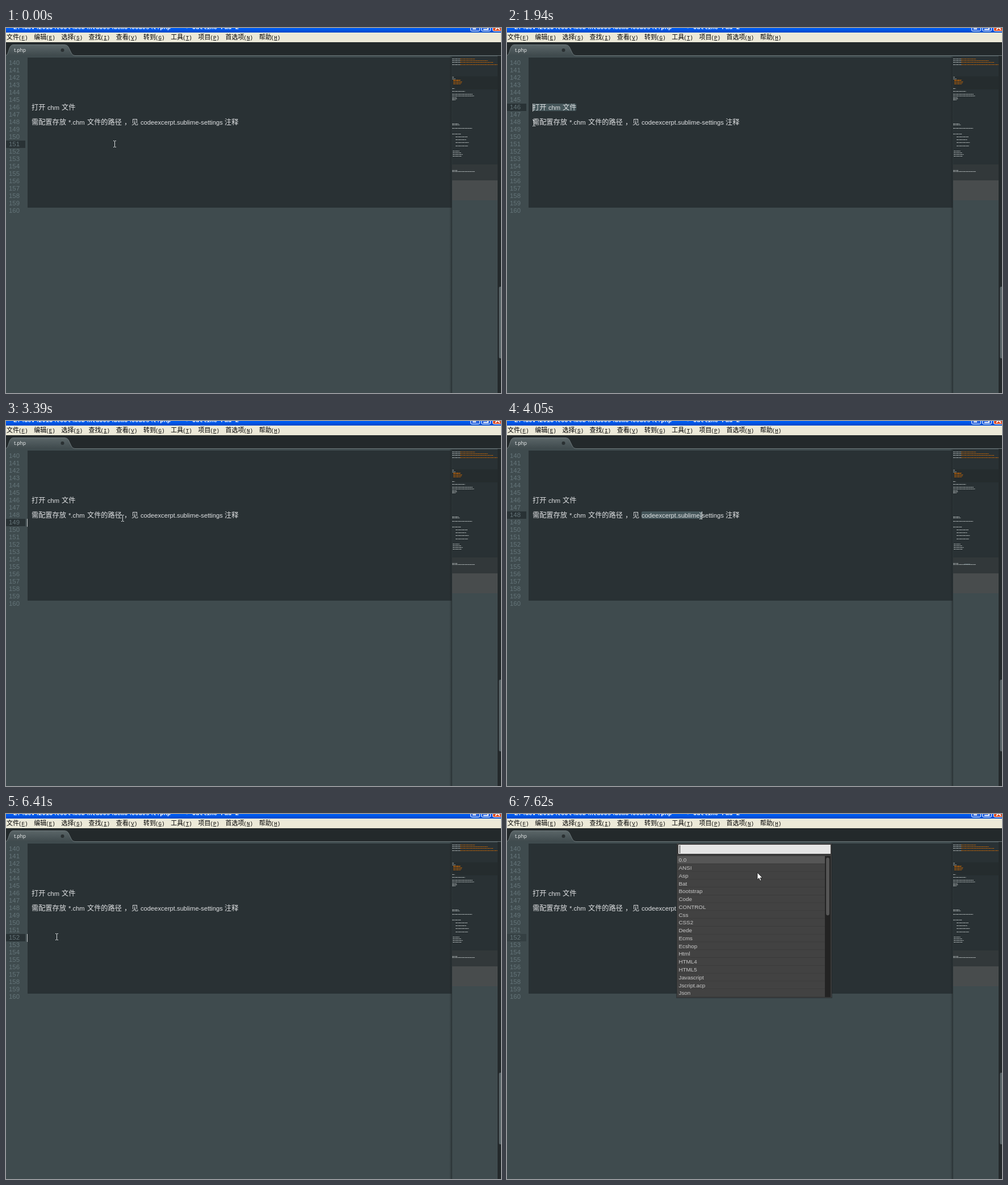
An HTML page that plays this animation: 872x642 px, repeating every 8 s.

```html
<!DOCTYPE html>
<html lang="zh-CN">
<head>
<meta charset="utf-8">
<title>t.php</title>
<style>
  html, body { margin: 0; width: 100%; height: 100%; overflow: hidden; background: #3f4b4e; }
  svg { display: block; }
  text { white-space: pre; }
  .cjk { font-family: "Noto Sans CJK SC", "Noto Sans CJK", sans-serif; font-weight: 300; }
  .code { font-family: "Liberation Sans", Arial, sans-serif; font-size: 11.2px; fill: #e0e2e4; }
  .code.cjk { font-family: "Noto Sans CJK SC", "Noto Sans CJK", sans-serif; font-size: 12.2px; }
  .num { font-family: "Liberation Sans", Arial, sans-serif; font-size: 11.4px; fill: #65757a; }
  .menu { font-size: 11px; fill: #000; }
  .key { font-family: "Liberation Mono", monospace; font-size: 9.2px; }
  .title { font: bold 10.5px "Liberation Mono", monospace; fill: #fff; }
  .tab { font: 8.6px "Open Sans", sans-serif; fill: #f2f4f4; }
  .item { font-family: "Liberation Sans", Arial, sans-serif; font-size: 9.8px; fill: #c8c8c8; }
</style>
</head>
<body>
<svg width="872" height="642" viewBox="0 0 872 642">
  <defs>
    <linearGradient id="tabFill" x2="0" y2="1">
      <stop offset="0" stop-color="#5b6668"/><stop offset="1" stop-color="#3f4a4d"/>
    </linearGradient>
    <linearGradient id="blue" x2="0" y2="1">
      <stop offset="0" stop-color="#0061fc"/><stop offset="1" stop-color="#0047c8"/>
    </linearGradient>
    <linearGradient id="edge">
      <stop offset="0" stop-color="#1c2224" stop-opacity="0"/><stop offset="1" stop-color="#1c2224" stop-opacity=".6"/>
    </linearGradient>
  </defs>

  <rect width="872" height="642" fill="#3f4b4e"/>
  <rect x="38" y="52" width="747" height="264" fill="#293134"/>
  <rect id="row" width="34" height="13"/>
  <g id="numbers"></g>
  <rect id="sel" height="13" rx="2" fill="#45565a"/>
  <g id="code"></g>
  <rect id="caret" width="1" height="14" fill="#c8cccd"/>

  <g id="map">
    <rect x="786" y="50" width="80" height="218" fill="#293134"/>
    <rect x="786" y="85" width="80" height="23" fill="#252c2e"/>
    <rect x="786" y="240" width="80" height="28" fill="#32383a"/>
    <rect x="786" y="268" width="80" height="35" fill="#484c4d"/>
    <rect id="mapSel" x="786" y="251" height="2" fill="#566569"/>
  </g>
  <rect x="781" y="50" width="5" height="592" fill="url(#edge)"/>
  <rect x="866" y="48" width="6" height="594" fill="#23292b"/>
  <rect x="868.5" y="455" width="5" height="126" rx="2" fill="#5a6568"/>

  <rect y="25" width="872" height="23" fill="#23292b"/>
  <path id="tab" d="M0 48.500C6 46 4 29.500 13 29.500H103Q108 29.500 110 33.500L115 44Q117 48.500 121 48.500" fill="url(#tabFill)" stroke="#6c777a"/>
  <path d="M121 48.500H872" stroke="#6c777a"/>
  <text class="tab" x="14" y="41.500">t.php</text>
  <circle cx="99.500" cy="39" r="3" fill="#2a3032"/>

  <rect width="872" height="8" fill="url(#blue)"/>
  <text class="title" x="13" y="2">E:\dev\2013\tool\web\htdocs\demo\codes\t.php •  - Outline Pad 2</text>
  <g stroke="#fff">
    <rect x="818.500" y="-9.500" width="16" height="15" rx="2" fill="#2a66e0"/>
    <rect x="837.500" y="-9.500" width="16" height="15" rx="2" fill="#2a66e0"/>
    <rect x="857.500" y="-9.500" width="16" height="15" rx="2" fill="#dc4a22"/>
    <path d="M822 1.500H828M841 2.500H849V0M862 3L866 -1L870 3" fill="none" stroke-width="2"/>
  </g>
  <rect y="8" width="872" height="17" fill="#ece9d8"/>
  <g id="menu"></g>

  <g id="panel">
    <rect x="298" y="52" width="275" height="272" fill="#1c2224" opacity=".5"/>
    <rect x="299" y="52" width="273" height="271" fill="#3b3b3b"/>
    <rect x="302" y="54" width="268" height="16" fill="#e5e5e5"/>
    <rect id="field" x="304" y="55" width="1" height="14" fill="#222"/>
    <rect x="300" y="74" width="260" height="248" fill="#424242"/>
    <rect x="560" y="74" width="10" height="248" fill="#232323"/>
    <rect x="562.500" y="77" width="5" height="101" rx="2.500" fill="#555" stroke="#666" stroke-width=".5"/>
    <g id="items"></g>
  </g>

  <path id="beam" d="M-2.500 -5.500H-.5M.5 -5.500H2.500M0 -5V5M-2.500 5.500H-.5M.5 5.500H2.500" fill="none" stroke="#d8dcdd"/>
  <path id="arrow" d="M0 0V12.500L2.800 9.800L5 14.500L7 13.600L5 9.200H9Z" fill="#fff" stroke="#111" stroke-width=".8"/>
</svg>

<script>
const $ = id => document.getElementById(id);
const LOOP = 8000, TICK = 131, BLINK = 540, OPEN = 6530, POINTER = 6680;

function set(el, attrs) {
  for (const k in attrs) el.setAttribute(k, attrs[k]);
}
function add(parent, tag, attrs, label) {
  const el = document.createElementNS('http://www.w3.org/2000/svg', tag);
  set(el, attrs);
  if (label) el.textContent = label;
  $(parent).append(el);
}
const show = (el, on) => set(el, { visibility: on ? 'visible' : 'hidden' });
const rowTop = n => 55 + 13 * (n - 140);

// Editor text
for (let n = 140; n <= 160; n++)
  add('numbers', 'text', { class: 'num', x: 5, y: rowTop(n) + 10 }, String(n));

function line(n, parts) {
  for (const [x, s] of parts) {
    const cjk = s.charCodeAt(0) > 255;
    add('code', 'text', { class: cjk ? 'code cjk' : 'code', x, y: rowTop(n) + 11 }, s);
  }
}
line(146, [[45, '打开'], [73, 'chm'], [98, '文件']]);
line(148, [[45, '需配置存放'], [110, '*.chm'], [143, '文件的路径'], [208, '，'], [221, '见'],
  [237, 'codeexcerpt.sublime-settings'], [385, '注释']]);

// Menu bar
let menuX = 1;
for (const entry of '文件F 编辑E 选择S 查找I 查看V 转到G 工具T 项目P 首选项N 帮助H'.split(' ')) {
  const name = entry.slice(0, -1), key = entry.slice(-1);
  const keyX = menuX + name.length * 11 - 1;
  add('menu', 'text', { class: 'cjk menu', x: menuX, y: 20 }, name);
  add('menu', 'text', { class: 'key', x: keyX, y: 19.5 }, `(${key})`);
  add('menu', 'rect', { x: keyX + 5.5, y: 21, width: 5.5, height: 1 });
  menuX += name.length * 11 + 26.2;
}

// Panel list
const names = 'ANSI Asp Bat Bootstrap Code CONTROL Css CSS2 Dede Ecms Ecshop Html HTML4 HTML5 Javascript Jscript.acp Json';
['0.0', ...names.split(' ')].forEach((name, i) => {
  const y = 74 + i * 13.77;
  add('items', 'rect', { x: 300, y, width: 260, height: 13.2, fill: i ? '#424242' : '#565656' });
  add('items', 'rect', { x: 300, y: y + 13, width: 260, height: 0.8, fill: '#393939' });
  add('items', 'text', { class: 'item', x: 302.5, y: y + 10.2 }, name);
});

// Minimap
let seed = 7;
const random = () => (seed = seed * 16807 % 2147483647) / 2147483647;
const WHITE = '#a9b0b1', ORANGE = '#b05f0c';

function stroke(y, indent, width, color) {
  add('map', 'path', {
    d: `M${786 + indent} ${Math.floor(y) + 0.5}h${width}`, stroke: color, 'stroke-dasharray': '3 .6 2 .5'
  });
}
function block(y, count, pitch, indent, width, color = WHITE) {
  for (let i = 0; i < count; i++)
    stroke(y + i * pitch, indent, width * (0.6 + 0.4 * random()), color);
}
for (let i = 0; i < 4; i++) {
  stroke(54 + i * 3.4, 0, 14, WHITE);
  stroke(54 + i * 3.4, 14, 26 + 40 * Math.sqrt(i / 3), ORANGE);
}
block(86, 2, 3, 0, 6);
block(91, 5, 1.8, 2, 18, ORANGE);
block(106, 1, 1, 0, 5);
block(111, 1, 1, 0, 25);
block(116, 2, 3, 0, 44);
block(122, 3, 2.2, 0, 9);
block(168, 2, 2, 0, 15);
block(176, 1, 1, 0, 40);
block(186, 1, 1, 0, 25);
block(191, 4, 5.4, 6, 24);
block(216, 4, 3, 1, 18);
stroke(250, 0, 9, WHITE);
stroke(252, 0, 40, WHITE);

// Pointer path: time, x, y
const path = [[0, 191, 204], [740, 122, 138], [1160, 122, 139], [1280, 104, 138], [1680, 46, 167], [2580, 49, 169],
  [2840, 150, 166], [3240, 206, 168], [3630, 203, 178], [4050, 341, 167], [4210, 384, 167], [4470, 391, 197],
  [4860, 122, 202], [5130, 85, 218], [5590, 89, 216], [OPEN, 89, 216], [7070, 441, 103]];

// Clicks and drags: time, row, anchor x, caret x
const edits = [[-BLINK, 151, 37, 37], [1160, 146, 122, 122], [1680, 146, 122, 45], [2060, 148, 57, 57],
  [2990, 148, 109, 143], [3240, 148, 109, 233], [3390, 149, 37, 37], [4050, 148, 237, 343], [4210, 148, 237, 382],
  [4350, 150, 37, 37], [5290, 152, 37, 37]];

function segment(track, t) {
  const i = track.findLastIndex(k => k[0] <= t);
  const a = track[i], b = track[i + 1] || a;
  if (a === b) return [a, b, 0];
  const span = b[0] - a[0], ticks = Math.max(1, Math.round(span / TICK));
  const p = Math.min(1, Math.floor((t - a[0]) / span * ticks + 0.15) / ticks);
  return [a, b, p * p * (3 - 2 * p)];
}
const mix = (a, b, p) => a + (b - a) * p;
const blinkOn = since => since % (2 * BLINK) < BLINK;

function draw(t) {
  const [m0, m1, mp] = segment(path, t);
  const [e0, e1, ep] = segment(edits, t);
  const [start, row, anchor, x] = e0;
  const drag = e1[1] === row && e1[2] === anchor;
  const caretX = drag ? mix(x, e1[3], ep) : x;
  const from = Math.min(anchor, caretX), width = Math.abs(anchor - caretX);
  const open = t >= OPEN, pointer = t >= POINTER;
  const y = rowTop(row);

  set($('row'), { y, fill: open ? '#354043' : '#293235' });
  set($('caret'), { x: caretX, y });
  show($('caret'), !open && blinkOn(t - start));
  set($('sel'), { x: from, y, width });
  set($('mapSel'), { x: 781.7 + from / 10, width: row === 148 ? width / 10 : 0 });

  show($('panel'), open);
  show($('field'), open && blinkOn(t - OPEN));
  show($('beam'), !pointer);
  show($('arrow'), pointer);
  const mx = Math.round(mix(m0[1], m1[1], mp)), my = Math.round(mix(m0[2], m1[2], mp));
  set($(pointer ? 'arrow' : 'beam'), { transform: `translate(${mx + (pointer ? 0 : 0.5)} ${my})` });
}

function tick() {
  draw(performance.now() % LOOP);
  requestAnimationFrame(tick);
}
tick();
</script>
</body>
</html>
```
